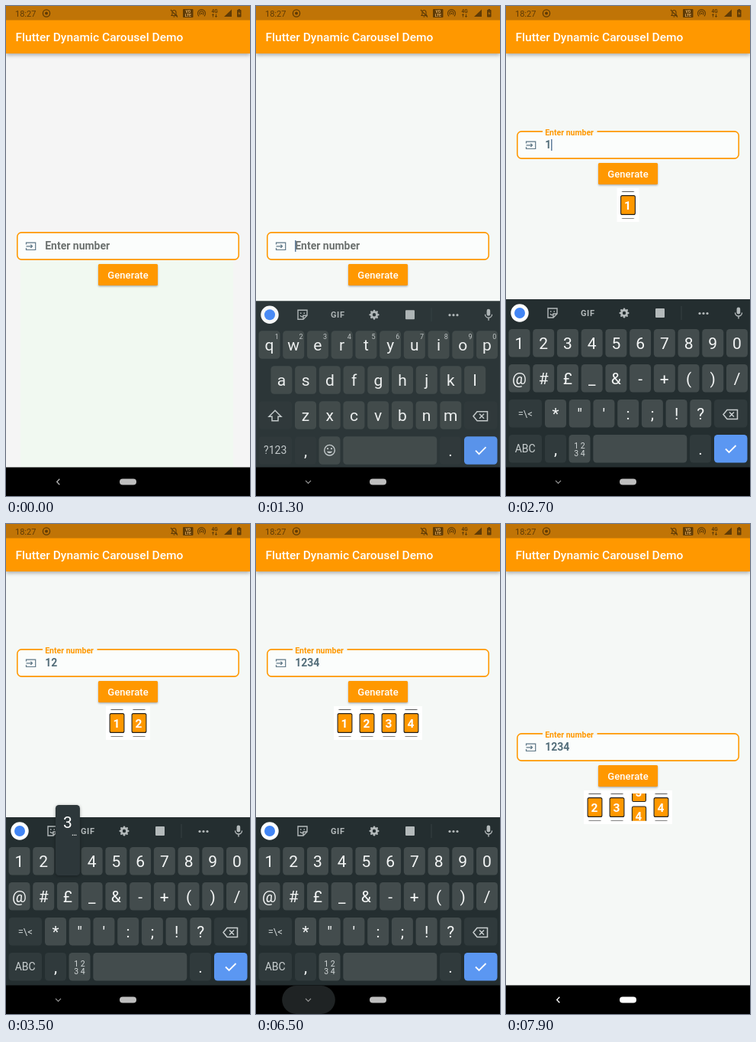
Recreate the animation shown at these times as an HTML page with a canvas. Size 320 px wide and 640 px high, loop 8 s.

```html
<!DOCTYPE html>
<html lang="en">
<head>
<meta charset="utf-8">
<title>Flutter Dynamic Carousel Demo</title>
<style>
  html, body { margin: 0; width: 100%; height: 100%; overflow: hidden; background: #000; }
  canvas { display: block; }
</style>
</head>
<body>
<canvas id="stage" width="320" height="640"></canvas>
<script>
const c = document.getElementById('stage').getContext('2d');
const LOOP = 8000, ORANGE = '#ff9800', PAPER = '#f5f8f6', INK = '#5f3b06';
const ICON = '#b4babb', KEY = '#434c4d', DARK_KEY = '#303a3c', BOARD = '#242e30';
const KB_IN = 1050, FLOAT = 1600, SYMBOLS = 2200, BACK = 6400, KB_OUT = 6520;
const TAPS = [2400, 2900, 3500, 3900];
const SPINS = [[6900, 350], [7300, 320], [7700, 340]];

const clamp = v => Math.max(0, Math.min(1, v));
const smooth = u => u * u * (3 - 2 * u);

function box(x, y, w, h, r, fill, stroke, width = 1) {
  c.beginPath();
  c.roundRect(x, y, w, h, r);
  if (fill) { c.fillStyle = fill; c.fill(); }
  if (stroke) { c.strokeStyle = stroke; c.lineWidth = width; c.stroke(); }
}

function disc(x, y, r, fill, stroke, width) {
  box(x - r, y - r, 2 * r, 2 * r, r, fill, stroke, width);
}

function text(s, x, y, size, color, weight = 400, align = 'center') {
  c.font = `${weight} ${size}px Roboto, sans-serif`;
  c.textAlign = align;
  c.fillStyle = color;
  c.fillText(s, x, y);
}

function path(d, x, y, color, width) {
  c.save();
  c.translate(x, y);
  const p = new Path2D(d);
  if (width) { c.strokeStyle = color; c.lineWidth = width; c.stroke(p); }
  else { c.fillStyle = color; c.fill(p); }
  c.restore();
}

function shadowed(blur, dy, draw) {
  c.save();
  c.shadowColor = 'rgba(0,0,0,.32)';
  c.shadowBlur = blur;
  c.shadowOffsetY = dy;
  draw();
  c.restore();
}

function header() {
  shadowed(5, 2, () => box(0, 0, 320, 62, 0, ORANGE));
  box(0, 0, 320, 18.5, 0, '#c07406');
  text('Flutter Dynamic Carousel Demo', 12.5, 46, 15.56, '#fff', 500, 'left');
  text('18:27', 12, 13.5, 11, INK, 400, 'left');
  disc(53, 9.5, 4.6, null, INK, 1.3);
  disc(53, 9.5, 2, INK);
  path('M-3.5 3H3.5L2.5 1.5V-1A2.5 3 0 0 0-2.5-1V1.5ZM-1 4.5H1M-4.5-4.5L4.5 5', 220.5, 9.5, INK, 1.1);
  box(232, 4, 13.5, 11, 1, INK);
  text('VO', 238.8, 9, 5, '#e8b060', 700);
  text('LTE', 238.8, 14, 5, '#e8b060', 700);
  path('M-3.4 3.8A5 5 0 1 1 3.4 3.8M-1.8 2A2.7 2.7 0 1 1 1.8 2', 256.5, 9.5, INK, 1.1);
  disc(256.5, 9.8, 1.1, INK);
  text('4G', 273.5, 9, 6.5, INK, 700);
  path('M-2 5V1M-3.5 2.5L-2 1L-.5 2.5M2 1V5M.5 3.5L2 5L3.5 3.5', 273.5, 9.5, INK, .9);
  path('M-5 4.5H5V-5Z', 291, 9.5, INK);
  box(303, 5, 5.5, 9.5, .8, INK);
  box(304.5, 4, 2.5, 1.5, 0, INK);
  path('M.5-3L-1.5.5H0L-.5 3L1.5-.5H0Z', 305.8, 9.7, '#c07406');
}

function field(y, value, floating, cursorOn) {
  box(14.8, y + .9, 290.4, 35.2, 5.5, '#fbfdfc', ORANGE, 1.56);
  path('M-6-2.2V-4.7H6.2V4.7H-6V2.2M-6 0H2M-.2-2.2L2 0L-.2 2.2', 32.5, y + 18.8, '#5d7685', 1.2);
  if (floating) {
    box(48, y - 1, 71.5, 4, 0, PAPER);
    text('Enter number', 51.2, y + 6, 10.5, ORANGE, 700, 'left');
  }
  text(value || 'Enter number', 51.2, y + 23.3, 14, value ? '#546e7a' : '#6c716f', 700, 'left');
  if (cursorOn) {
    const w = value ? c.measureText(value).width : 0;
    box(51 + w, y + 11, 1.5, 15, 0, '#607d9b');
  }
}

function button(y) {
  shadowed(2.5, 1.2, () => box(121, y, 78, 28, 1.5, ORANGE));
  c.letterSpacing = '.1px';
  text('Generate', 160, y + 18.5, 13, '#fff', 500);
  c.letterSpacing = '0px';
}

function carousel(y, count, t) {
  const width = count * 29, left = 160 - width / 2;
  box(left, y, width, 44, 0, '#fff');
  c.save();
  c.beginPath();
  c.rect(left, y + 4, width, 35.8);
  c.clip();
  for (let i = 0; i < count; i++) {
    const spin = SPINS[i] ? smooth(clamp((t - SPINS[i][0]) / SPINS[i][1])) : 0;
    const x = left + i * 29 + 14.5;
    for (let k = -1; k <= 2; k++) {
      const offset = (k - spin) * 30.3;
      const squash = 1 - Math.min(.12, Math.abs(offset) / 400);
      c.save();
      c.translate(x, y + 22 + offset);
      c.scale(squash, Math.abs(offset) > 20 ? 1 : squash);
      box(-9.4, -12.4, 18.8, 24.8, 2, ORANGE, '#222', 1.1);
      text((i + k + count) % count + 1, -.6, 5.8, 15.5, '#fff', 700);
      c.restore();
    }
  }
  c.restore();
}

function toolbar() {
  disc(18, 401, 11.7, '#fff');
  disc(18, 401, 7, '#4285f4');
  path('M6-1V-6H-6V6H1L6 1V-1M1 6V1H6M-3-2H-1.5M1.5-2H3M-3 1Q-1 4 1 1.5', 61, 401, ICON, 1.4);
  c.letterSpacing = '.6px';
  text('GIF', 107.3, 405, 11, ICON, 700);
  c.letterSpacing = '0px';
  disc(155, 401, 3.6, null, ICON, 2.8);
  for (let i = 0; i < 8; i++) {
    const a = i * Math.PI / 4;
    disc(155 + 5.2 * Math.cos(a), 401 + 5.2 * Math.sin(a), 1.3, ICON);
  }
  box(196, 395, 12, 12, 1, ICON);
  box(229.5, 392, 1, 18, 0, '#374143');
  for (const x of [254, 259, 264]) disc(x, 401.5, 1.6, ICON);
  box(302.6, 393.5, 4.6, 9, 2.3, ICON);
  path('M-4.5-1A4.5 4.5 0 0 0 4.5-1M0 3.5V7', 305, 401.5, ICON, 1.4);
}

function key(x, y, w, label, size = 21, fill = KEY, color = '#f4f6f6') {
  box(x, y, w, 36.5, 4.5, fill);
  text(label, x + w / 2, y + 25.6, size, color);
}

function keyRow(chars, x, y, digits) {
  [...chars].forEach((ch, i) => {
    const kx = x + i * 31.72;
    key(kx, y, 28, ch);
    if (digits) text((i + 1) % 10, kx + 23.7, y + 10.5, 9, '#c3c8c9');
  });
}

function keyboard(t) {
  const symbols = t >= SYMBOLS;
  box(0, 383, 320, 222, 0, BOARD);
  toolbar();
  keyRow(symbols ? '1234567890' : 'qwertyuiop', 3.5, 422, !symbols);
  keyRow(symbols ? '@#£_&-+()/' : 'asdfghjkl', symbols ? 3.5 : 19.4, 468);
  keyRow(symbols ? '*"\':;!?' : 'zxcvbnm', 51, 514);

  key(3.5, 514, 43.5, '', 1, DARK_KEY);
  if (symbols) text('=\\<', 25.2, 537, 13, '#c9cfd0');
  else path('M0-7L-8 1H-4V6.5H4V1H8Z', 25, 533, '#c9cfd0', 1.5);
  key(273, 514, 43.5, '', 1, DARK_KEY);
  path('M-9.5 0L-4.5-6H9V6H-4.5ZM-1.5-3L4.5 3M4.5-3L-1.5 3', 294.5, 533.5, '#c9cfd0', 1.5);

  const pressed = t >= 2100 && t < SYMBOLS;
  box(3.5, 560, 43.5, 36.5, 4.5, pressed ? '#566062' : DARK_KEY);
  text(symbols ? 'ABC' : '?123', 25.2, 583, 14, '#c9cfd0');
  key(51, 560, 28, ',', 21, DARK_KEY);
  key(82.5, 560, 28, '');
  if (symbols) {
    text('1 2', 96.5, 577.5, 10.5, '#d4d9da');
    text('3 4', 96.5, 588, 10.5, '#d4d9da');
  } else {
    disc(96.5, 578, 6.8, null, '#c9cfd0', 1.4);
    disc(94, 576, 1.1, '#c9cfd0');
    disc(99, 576, 1.1, '#c9cfd0');
    path('M-3.7 1.5A4 4 0 0 0 3.7 1.5Z', 96.5, 578, '#c9cfd0');
  }
  key(114.3, 560, 123, '');
  key(241, 560, 28, '.', 21, DARK_KEY);
  box(273, 560, 43.5, 36.5, 4.5, '#5b97f2');
  path('M-6.5 0L-2 4.5L7-4.5', 294.5, 578.5, '#fff', 1.8);

  TAPS.forEach((tap, i) => {
    if (t < tap || t >= tap + 200) return;
    const x = 1.5 + i * 31.72;
    shadowed(4, 1, () => box(x, 367, 32, 92, 4.5, '#2d373a'));
    text(i + 1, x + 16, 397, 21, '#fff');
    text('…', x + 24.5, 407, 10, '#fff', 500);
  });
}

function navigation(t, keyboardOpen) {
  box(0, 602.5, 320, 37.5, 0, '#000');
  const ripple = clamp((t - BACK) / 250);
  const fade = 1 - clamp((t - 6800) / 400);
  if (ripple && fade) {
    const half = 30 + 12 * ripple;
    c.save();
    c.globalAlpha = fade;
    c.beginPath();
    c.rect(0, 602.5, 320, 37.5);
    c.clip();
    box(69 - half, 603, 2 * half, 37, 18.5, '#1f2324');
    c.restore();
  }
  if (keyboardOpen) path('M-3.5-1.7L0 1.8L3.5-1.7', 68.5, 621.5, '#999', 1.2);
  else path('M1.8-3.7L-1.8 0L1.8 3.7', 68.5, 621.5, t > BACK ? '#fff' : '#b5b5b5', 1.3);
  box(149, 617.5, 22, 8, 4, t >= 6600 ? '#fff' : '#bebebe');
}

function render(t) {
  const value = '1234'.slice(0, TAPS.filter(tap => t >= tap + 100).length);
  const raised = t >= FLOAT && t < 6600;
  const shift = (raised ? -110 : 0) - (value ? 22 : 0);
  const lastEdit = [1300, ...TAPS.map(tap => tap + 100)].filter(e => t >= e).pop();
  const cursorOn = lastEdit !== undefined && Math.floor((t - lastEdit) / 500) % 2 === 0;

  box(0, 0, 320, 640, 0, t < 400 ? '#f5f5f5' : PAPER);
  if (t < 400) box(19, 333, 279, 270, 0, '#f1f9f1');
  header();
  field(295 + shift, value, t >= FLOAT, cursorOn);
  button(337 + shift);
  if (value) carousel(370 + shift, value.length, t);

  const drop = t < 4000
    ? (1 - clamp((t - KB_IN) / 320)) ** 3
    : clamp((t - KB_OUT) / 170) ** 2;
  if (drop < 1) {
    c.save();
    c.globalAlpha = 1 - drop ** .7;
    c.translate(0, 219 * drop);
    keyboard(t);
    c.restore();
  }
  navigation(t, t >= 1100 && t < 6600);
}

function frame(now) {
  render(now % LOOP);
  requestAnimationFrame(frame);
}
requestAnimationFrame(frame);
</script>
</body>
</html>
```
